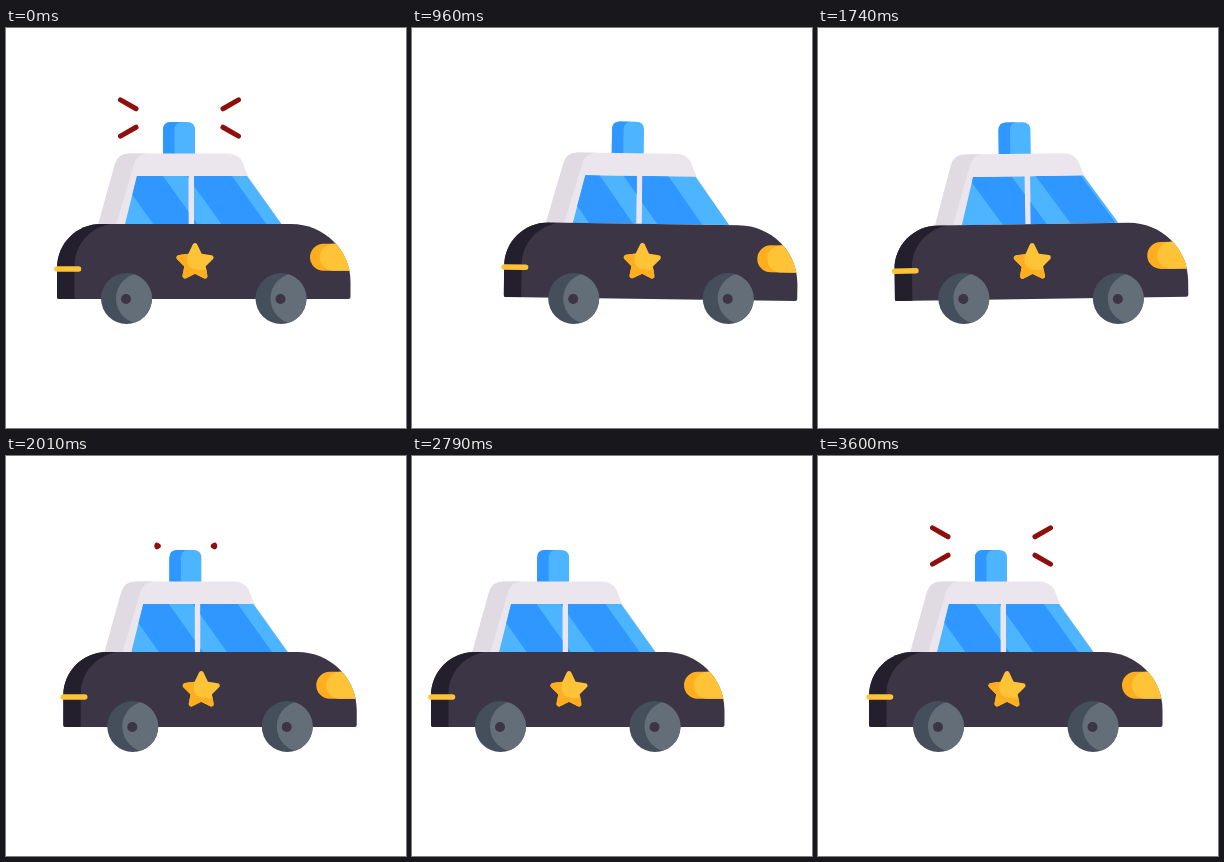
Animation, 400 px wide and 400 px high, one loop 5630 ms. Source, as an HTML page:

```html
<!DOCTYPE html>
<html lang="en">
<head>
<meta charset="utf-8">
<title>Police car</title>
<style>
  html, body { margin: 0; width: 100%; height: 100%; overflow: hidden; background: #fff; }
  svg { display: block; width: 100%; height: 100%; }
</style>
</head>
<body>
<svg viewBox="0 0 400 400">
  <defs>
    <path id="hull" d="M53 271Q51 271 51 269V240C51 215 71 196 95 196H285C318 196 344.5 222 344.5 254V269Q344.5 271 342.5 271Z"/>
    <path id="star" d="M189 217.5L194 228L205 229.6L197 237.6L199 248L189 243L179 248L181 237.6L173 229.6L184 228Z" stroke-width="5" stroke-linejoin="round"/>
    <clipPath id="inHull"><use href="#hull"/></clipPath>
    <clipPath id="inGlass"><path d="M131 148H182.5V196H119Z M188 148H241L275.5 196H188Z"/></clipPath>
    <clipPath id="inStar"><path d="M189 215Q190.8 215 191.7 217L195.7 225.6L205 227Q209.300 228.300 206.800 231.400L199.700 238.500L201.500 247.500Q201.400 251.300 197.900 250.300L189 245.800L180.100 250.300Q176.600 251.300 176.500 247.500L178.300 238.500L171.200 231.400Q168.700 228.300 173 227L182.300 225.600L186.300 217Q187.200 215 189 215Z"/></clipPath>
    <clipPath id="inWheel"><circle r="25.5"/></clipPath>
    <g id="wheel">
      <circle r="25.5" fill="#454f5b"/>
      <circle cx="15" r="25.5" fill="#636e78" clip-path="url(#inWheel)"/>
      <circle cx="-.5" cy=".5" r="5" fill="#3b3546"/>
    </g>
  </defs>
  <g id="car">
    <g id="body">
      <path fill="#4db4ff" d="M157 127V102Q157 94 165 94H181Q189 94 189 102V127Z"/>
      <path fill="#2f97ff" d="M157 127V102Q157 94 165 94H176.500Q168.500 94 168.500 102V127Z"/>
      <path fill="#ebe6ed" d="M92 197L109 136Q112 125.500 123 125.500H222Q231 125.500 236 133L242 148L276 197Z"/>
      <path fill="#e0dae3" d="M92 197L109 136Q112 125.500 123 125.500H142Q131 125.500 128 136L110 197Z"/>
      <g clip-path="url(#inGlass)">
        <path fill="#4db4ff" d="M110 140H290V200H110Z"/>
        <path id="shade" fill="#2f97ff" d="M113 148H157L192 197H148Z M181 148H226L261 197H216Z"/>
      </g>
      <use href="#hull" fill="#3b3546"/>
      <path fill="#231f2d" clip-path="url(#inHull)" d="M50 272V195H112C88 196 68.500 214 68.500 238V272Z"/>
      <path stroke="#ffc338" stroke-width="5.500" stroke-linecap="round" d="M51 241H72.500"/>
      <g clip-path="url(#inHull)">
        <rect x="304" y="215.700" width="60" height="27" rx="13.500" fill="#ffae20"/>
        <rect x="314" y="215.700" width="60" height="27" rx="13.500" fill="#ffc338"/>
      </g>
      <use href="#star" fill="#ffc338" stroke="#ffc338"/>
      <path fill="#ffae20" clip-path="url(#inStar)" d="M168 226H182Q179 238 188 241Q196 243 201 241V252H168Z"/>
    </g>
    <use href="#wheel" x="120.500" y="270.500"/>
    <use href="#wheel" x="275" y="270.500"/>
    <path id="rays" fill="none" stroke="#8d100d" stroke-width="5" stroke-linecap="round"/>
  </g>
</svg>
<script>
const LOOP = 5630, ACTIVE = 3600, STEP = 30;
const [car, body, shade, rays] = ["car", "body", "shade", "rays"].map(id => document.getElementById(id));

// Keys are [time, value] pairs
const drive = [[0, 0], [1200, 46], [2800, -32], [3600, 0]];
const sway = [[0, 0], [800, 1], [1600, -1], [2400, 1], [3200, -1], [3600, 0]];

const ramp = (t, a, b) => Math.min(1, Math.max(0, (t - a) / (b - a)));

function eased(keys, t) {
  let i = 1;
  while (i < keys.length - 1 && t > keys[i][0]) i++;
  const [t0, v0] = keys[i - 1], [t1, v1] = keys[i];
  const u = ramp(t, t0, t1);
  return v0 + (v1 - v0) * u * u * (3 - 2 * u);
}

// Visible part of each ray, as fractions from the inner end
function trim(t) {
  if (t < 400) return [0.355 + 0.645 * ramp(t, 0, 267), 0.7 + 0.3 * ramp(t, 0, 100)];
  if (t >= 2800) return [0.355 * ramp(t, 2933, 3220), 0.7 * ramp(t, 2800, 3176)];
  const c = (t - 400) % 800;
  return [ramp(c, 133, 533), ramp(c, 0, 333)];
}

function rayPath([from, to]) {
  if (to - from < 0.001) return "";
  let d = "";
  for (const sx of [-1, 1]) for (const sy of [-1, 1]) {
    const at = f => `${173.5 + sx * (27.5 + 45 * f)} ${90 + sy * 26 * f}`;
    d += `M${at(from)}L${at(to)}`;
  }
  return d;
}

function draw(t) {
  const tilt = eased(sway, t);
  car.setAttribute("transform", `translate(${eased(drive, t)})`);
  body.setAttribute("transform", `rotate(${tilt} 197 234)`);
  shade.setAttribute("transform", `translate(${-15 * tilt})`);
  rays.setAttribute("d", rayPath(trim(t)));
}

const start = performance.now();
function tick() {
  const t = (performance.now() - start) % LOOP;
  draw(Math.min(ACTIVE, Math.floor(t / STEP) * STEP));
  requestAnimationFrame(tick);
}
tick();
</script>
</body>
</html>
```
